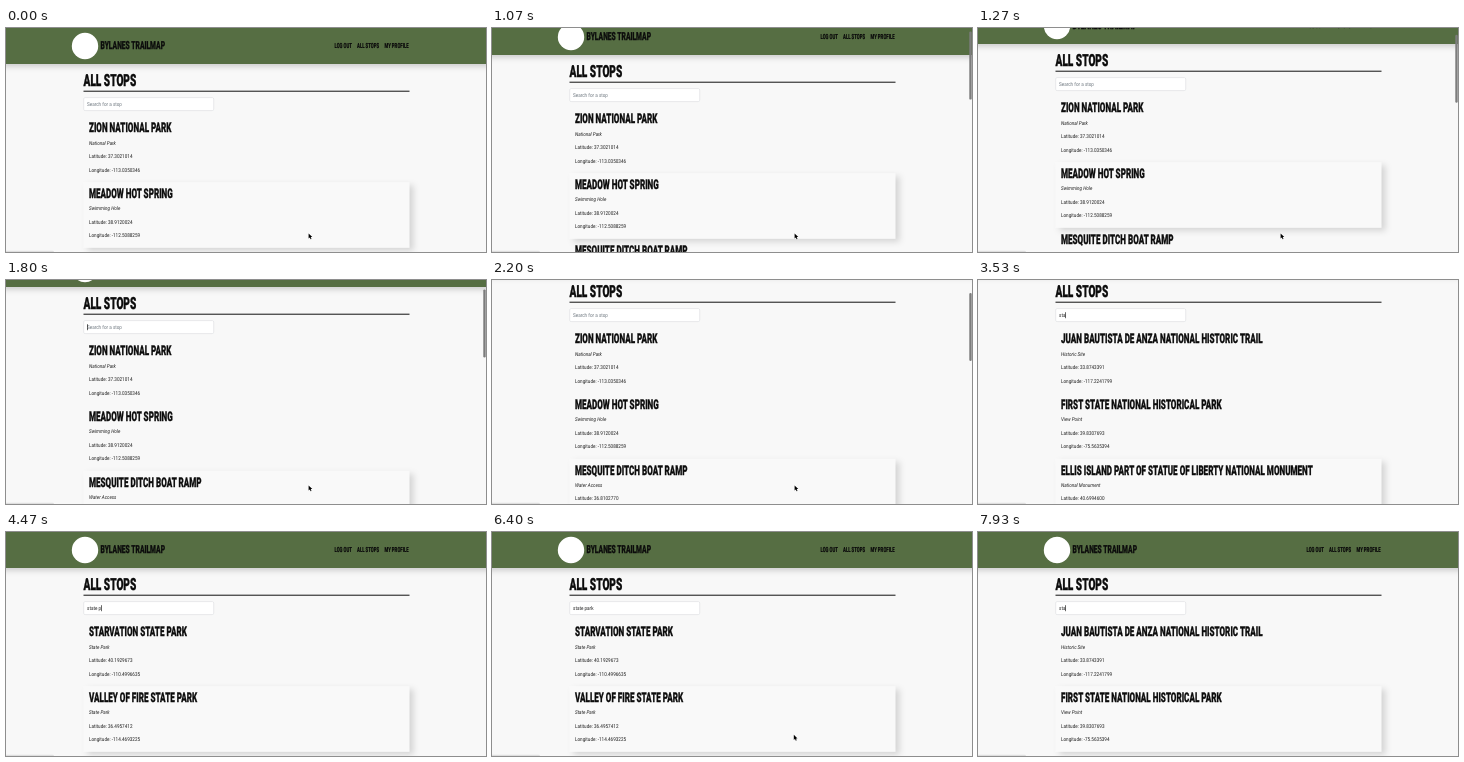
An HTML page for the animation above (8 s loop, 480 by 224 pixels).

```html
<!DOCTYPE html>
<html lang="en">
<head>
<meta charset="utf-8">
<title>All stops</title>
<style>
  html, body { margin: 0; width: 100%; height: 100%; overflow: hidden; background: #f8f8f8; }
  svg { display: block; width: 100vw; height: 100vh; }
  text { white-space: pre; text-rendering: geometricPrecision; }
  .head { font-family: Roboto, sans-serif; font-weight: 800; font-stretch: 75%;
    fill: #0c0c0c; stroke: #0c0c0c; stroke-width: .025em; }
  .body { font-family: Roboto, sans-serif; font-weight: 400; font-stretch: 87%; fill: #1c1c1c; }
  .italic { font-style: italic; }
  .nav { fill: #566e43; filter: drop-shadow(0 2px 3px rgba(0, 0, 0, .2)); }
  .hover { fill: #f9f9f9; filter: drop-shadow(4px 3px 3px rgba(0, 0, 0, .14)); }
</style>
</head>
<body>
<svg viewBox="0 0 480 224"></svg>
<script>
const FPS = 15, LOOP = 120;
const CARD_TOP = 88.6, CARD_STEP = 65.6;
const BODY_SIZE = 5.33;

const stops = [
  ['Zion National Park', 'National Park', '37.3021014', '-113.0350346'],
  ['Meadow Hot Spring', 'Swimming Hole', '38.9120024', '-112.5088259'],
  ['Mesquite Ditch Boat Ramp', 'Water Access', '36.8102770', '-114.0663218'],
  ['Juan Bautista de Anza National Historic Trail', 'Historic Site', '33.8743391', '-117.2241799'],
  ['First State National Historical Park', 'View Point', '39.8307693', '-75.5635394'],
  ['Ellis Island Part of Statue of Liberty National Monument', 'National Monument', '40.6994600', '-74.0395590'],
  ['Starvation State Park', 'State Park', '40.1929673', '-110.4996635'],
  ['Valley of Fire State Park', 'State Park', '36.4957412', '-114.4693225'],
];

// Each entry: tick, value from that tick on
const typing = [[0, ''], [46, 's'], [52, 'st'], [53, 'sta'], [55, 'stat'], [57, 'state'],
  [59, 'state '], [67, 'state p'], [68, 'state pa'], [72, 'state par'], [74, 'state park'],
  [104, 'state par'], [107, 'state pa'], [110, 'state p'], [112, 'state '],
  [113, 'state'], [117, 'stat'], [119, 'sta']];
const caretOn = [[0, 0], [5, 1], [13, 0], [20, 1], [28, 0], [35, 1], [42, 0], [46, 1],
  [81, 0], [89, 1], [96, 0], [104, 1]];
const hovered = [[0, 1], [24, 2], [67, 1]];
// The pointer hides while keys are pressed
const pointerAt = [[0, '302.6 205.4'], [46, null], [90, '301.8 202.8'], [104, null]];
// Interpolated between entries
const scrolling = [[9, 0], [13, 3], [16, 9], [19, 20], [22, 28.3], [26, 28.3], [27, 29],
  [30, 36.5], [33, 41], [66, 41], [67, 0]];
const barOpacity = [[9, 0], [11, 1], [41, 1], [44, 0]];

const held = (track, tick) => track.filter(([at]) => at <= tick).pop()[1];

function eased(track, tick) {
  const next = track.findIndex(([at]) => at > tick);
  if (next === 0) return track[0][1];
  if (next < 0) return track[track.length - 1][1];
  const [t0, v0] = track[next - 1], [t1, v1] = track[next];
  return v0 + (v1 - v0) * (tick - t0) / (t1 - t0);
}

const svg = document.querySelector('svg');

function add(parent, tag, attrs = {}, content = '') {
  const node = document.createElementNS('http://www.w3.org/2000/svg', tag);
  for (const key in attrs) node.setAttribute(key, attrs[key]);
  node.textContent = content;
  return parent.appendChild(node);
}

// How narrow a face has to be drawn, from the width of a sample in em
function narrowing(face, sample, ems) {
  const probe = add(svg, 'text', { class: face, 'font-size': 100 }, sample);
  const ratio = ems * 100 / probe.getComputedTextLength();
  probe.remove();
  return ratio;
}
const narrow = {
  head: narrowing('head', 'FIRST STATE NATIONAL HISTORICAL PARK', 12.06),
  body: narrowing('body', 'Latitude: 37.3021014', 8.16),
};

function write(parent, face, size, x, y, content, extra = '') {
  return add(parent, 'text', {
    class: `${face} ${extra}`, 'font-size': size,
    transform: `translate(${x} ${y}) scale(${narrow[face]} 1)`,
  }, content);
}

const page = add(svg, 'g');
add(page, 'rect', { class: 'nav', x: -10, y: -20, width: 500, height: 56 });
add(page, 'circle', { cx: 79, cy: 18, r: 13.2, fill: '#fff' });
write(page, 'head', 11.1, 94.5, 20.6, 'BYLANES TRAILMAP');
write(page, 'head', 7, 328.5, 19.9, 'LOG OUT');
write(page, 'head', 7, 351, 19.9, 'ALL STOPS');
write(page, 'head', 7, 378.5, 19.9, 'MY PROFILE');

write(page, 'head', 16.7, 77.5, 58.1, 'ALL STOPS');
add(page, 'rect', { x: 77.5, y: 62.7, width: 326, height: 1, fill: '#111' });
add(page, 'rect', { x: 77.7, y: 69.6, width: 130, height: 13, rx: 1.4,
  fill: '#fff', stroke: '#d4d7da', 'stroke-width': .5 });
const field = write(page, 'body', BODY_SIZE, 81, 77.7, '');
const caret = add(page, 'rect', { y: 73.2, width: .6, height: 6, fill: '#000' });

const hoverBox = add(page, 'rect', { class: 'hover', x: 77.5, width: 326, height: 65.6 });
const cards = [0, 1, 2].map(i => {
  const card = add(page, 'g', { transform: `translate(83 ${CARD_TOP + i * CARD_STEP})` });
  return [
    write(card, 'head', 13.33, 0, 15.8, ''),
    write(card, 'body', BODY_SIZE, 0, 28.1, '', 'italic'),
    write(card, 'body', BODY_SIZE, 0, 41.5, ''),
    write(card, 'body', BODY_SIZE, 0, 54.9, ''),
  ];
});

const bar = add(svg, 'rect', { x: 477.3, width: 2.4, height: 68, rx: 1.2, fill: '#7d7d7d' });
add(svg, 'rect', { x: -3, y: 222.8, width: 51, height: 5, rx: 1.5, fill: '#dedede' });
const pointer = add(svg, 'path', { d: 'M0 0V5.1L1.2 4L2 5.9L2.9 5.5L2.1 3.7H3.7Z',
  fill: '#000', stroke: '#fff', 'stroke-width': .5, 'paint-order': 'stroke' });

function showResults(query) {
  const found = stops.filter(([name, kind]) =>
    name.toLowerCase().includes(query) || kind.toLowerCase().includes(query));
  cards.forEach((lines, i) => {
    const [name, kind, lat, lon] = found[i] || [];
    const content = name
      ? [name.toUpperCase(), kind, `Latitude: ${lat}`, `Longitude: ${lon}`]
      : ['', '', '', ''];
    lines.forEach((line, n) => { line.textContent = content[n]; });
  });
}

let shownQuery = null;

function draw(now) {
  const tick = Math.floor(now * FPS / 1000 + .1) % LOOP;
  const query = held(typing, tick);
  if (query !== shownQuery) {
    shownQuery = query;
    showResults(query);
    field.textContent = query || 'Search for a stop';
    field.style.fill = query ? '#1c1c1c' : '#6c757d';
    const width = query ? field.getComputedTextLength() * narrow.body : 0;
    caret.setAttribute('x', 81 + width);
  }
  const scroll = eased(scrolling, tick);
  page.setAttribute('transform', `translate(0 ${-scroll})`);
  caret.setAttribute('opacity', held(caretOn, tick));
  hoverBox.setAttribute('y', CARD_TOP + held(hovered, tick) * CARD_STEP);
  bar.setAttribute('y', 1 + scroll * .29);
  bar.setAttribute('opacity', eased(barOpacity, tick));
  const place = held(pointerAt, tick);
  pointer.setAttribute('visibility', place ? 'visible' : 'hidden');
  if (place) pointer.setAttribute('transform', `translate(${place})`);
}

const start = performance.now();
function loop() {
  draw(performance.now() - start);
  requestAnimationFrame(loop);
}
loop();
</script>
</body>
</html>
```
